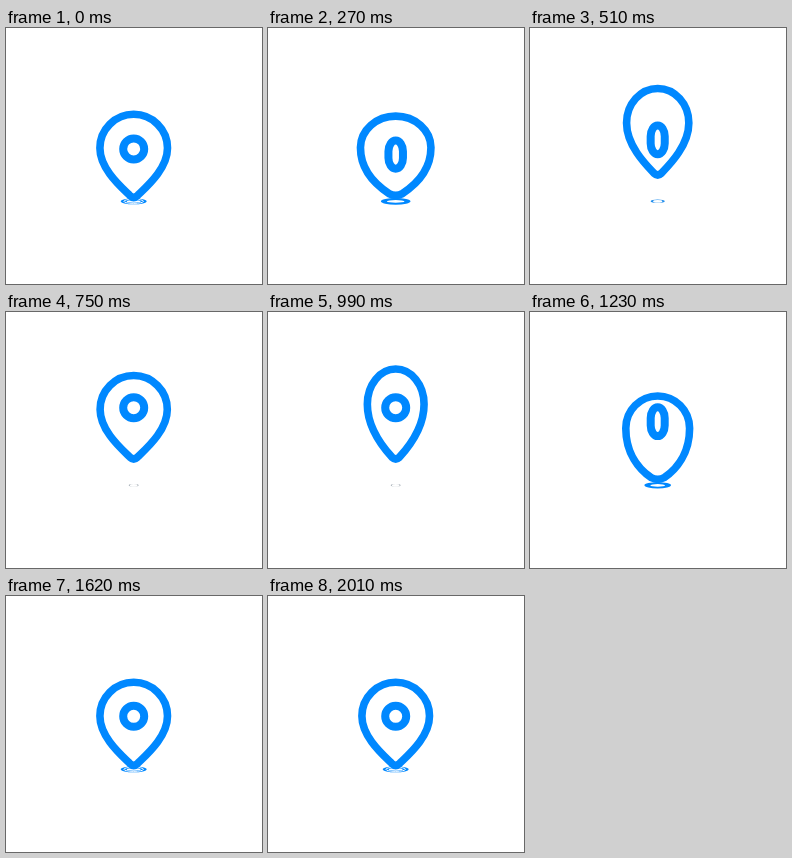
Recreate the animation shown at these times as an HTML page. Size 256 by 256 pixels, loop 2.22 s.

```html
<!DOCTYPE html>
<html lang="en">
<head>
<meta charset="utf-8">
<title>Bouncing map pin</title>
<style>
  html, body { margin: 0; width: 100%; height: 100%; overflow: hidden; background: #fff; }
  svg { display: block; width: 100vw; height: 100vh; }
  .line { fill: none; stroke: #08f; stroke-width: 7.6; stroke-linejoin: round; }
  #eye { stroke-width: 8; }
</style>
</head>
<body>
<svg viewBox="0 0 256 256">
  <ellipse id="disc" cy="173.3"/>
  <ellipse id="gap" cy="173.3" rx="9.8" ry="2.1" fill="none" stroke="#fff"/>
  <ellipse id="hole" cy="173.4" fill="#fff"/>
  <path id="pin" class="line"/>
  <rect id="eye" class="line"/>
</svg>
<script>
const LOOP = 2220, STEP = 30;
const CX = 127.7, FLOOR = 169.5, HEIGHT = 83.2, RADIUS = 33.8;
const $ = id => document.getElementById(id);
const set = (id, attrs) => {
  for (const k in attrs) $(id).setAttribute(k, attrs[k]);
};

// Smooth 0 to 1 between two times
const ramp = (t, from, to) => {
  const u = Math.min(1, Math.max(0, (t - from) / (to - from)));
  return u * u * (3 - 2 * u);
};
// Smooth 0 to 1 to 0 around a time
const bump = (t, mid, reach) => {
  const u = Math.min(1, Math.abs(t - mid) / reach);
  return Math.cos(u * Math.PI / 2) ** 2;
};

function drawPin(t) {
  const lift = 22.5 * (ramp(t, 270, 480) - ramp(t, 1080, 1230));
  // crouch, leap, wind-up, landing, recoil
  const stretch = -4.2 * bump(t, 180, 170) + 4.2 * bump(t, 450, 200)
    + 7.2 * bump(t, 1040, 330) - 8.4 * bump(t, 1325, 110) + bump(t, 1490, 110);
  // the sides fill out at take-off and touch-down
  const bulge = bump(t, 260, 150) + bump(t, 1235, 130);

  const base = FLOOR - lift;
  const top = base - HEIGHT - stretch;
  const tip = base - 2.2 * bulge;
  const mid = top + RADIUS + .2 * stretch - 2 * bulge;
  const w = RADIUS - .8 * stretch;
  const k = .552, h = tip - mid, shoulder = mid - k * (mid - top);
  const flank = mid + (.43 + .06 * bulge) * h;
  const end = 3.5 + 3 * bulge, endY = tip - 1.6;
  const hip = end + 8.5 + 4 * bulge, hipY = endY - .17 * h;
  set('pin', {
    d: `M${CX} ${top}
      C${CX + k * w} ${top} ${CX + w} ${shoulder} ${CX + w} ${mid}
      C${CX + w} ${flank} ${CX + hip} ${hipY} ${CX + end} ${endY}
      Q${CX} ${tip + 1.6} ${CX - end} ${endY}
      C${CX - hip} ${hipY} ${CX - w} ${flank} ${CX - w} ${mid}
      C${CX - w} ${shoulder} ${CX - k * w} ${top} ${CX} ${top}Z`
  });
}

// The eye trails the pin and grows long while it moves
function drawEye(t) {
  const y = 120.3 - 24.6 * (ramp(t, 390, 690) - ramp(t, 1100, 1340))
    + 6.5 * bump(t, 240, 300) + 4 * bump(t, 1360, 150);
  const long = ramp(t, 120, 300) - ramp(t, 500, 660) + bump(t, 1230, 150);
  const w = 10.5 - 3.5 * long, h = 10.5 + 3.9 * long;
  set('eye', { x: CX - w, y: y - h, width: 2 * w, height: 2 * h, rx: w, ry: (w + h) / 2 });
}

// The ripple shrinks and greys while the pin is in the air
function drawRipple(t) {
  const away = ramp(t, 290, 620) - ramp(t, 1040, 1240);
  const grey = away ** 6;
  const rx = 13 - 8 * away + 2.5 * (bump(t, 200, 200) + bump(t, 1320, 120));
  set('disc', {
    cx: CX, rx, ry: .22 * rx + .15,
    fill: `hsl(208, ${100 - 90 * grey}%, ${50 + 20 * grey}%)`
  });
  set('hole', { cx: CX, rx: rx - 6 + 4.8 * away, ry: 1.3 });
  set('gap', { cx: CX, opacity: 1 - ramp(t, 30, 180) + ramp(t, 1400, 1600) });
}

function draw() {
  const t = Math.floor(performance.now() % LOOP / STEP) * STEP;
  drawPin(t);
  drawEye(t);
  drawRipple(t);
  requestAnimationFrame(draw);
}
draw();
</script>
</body>
</html>
```
